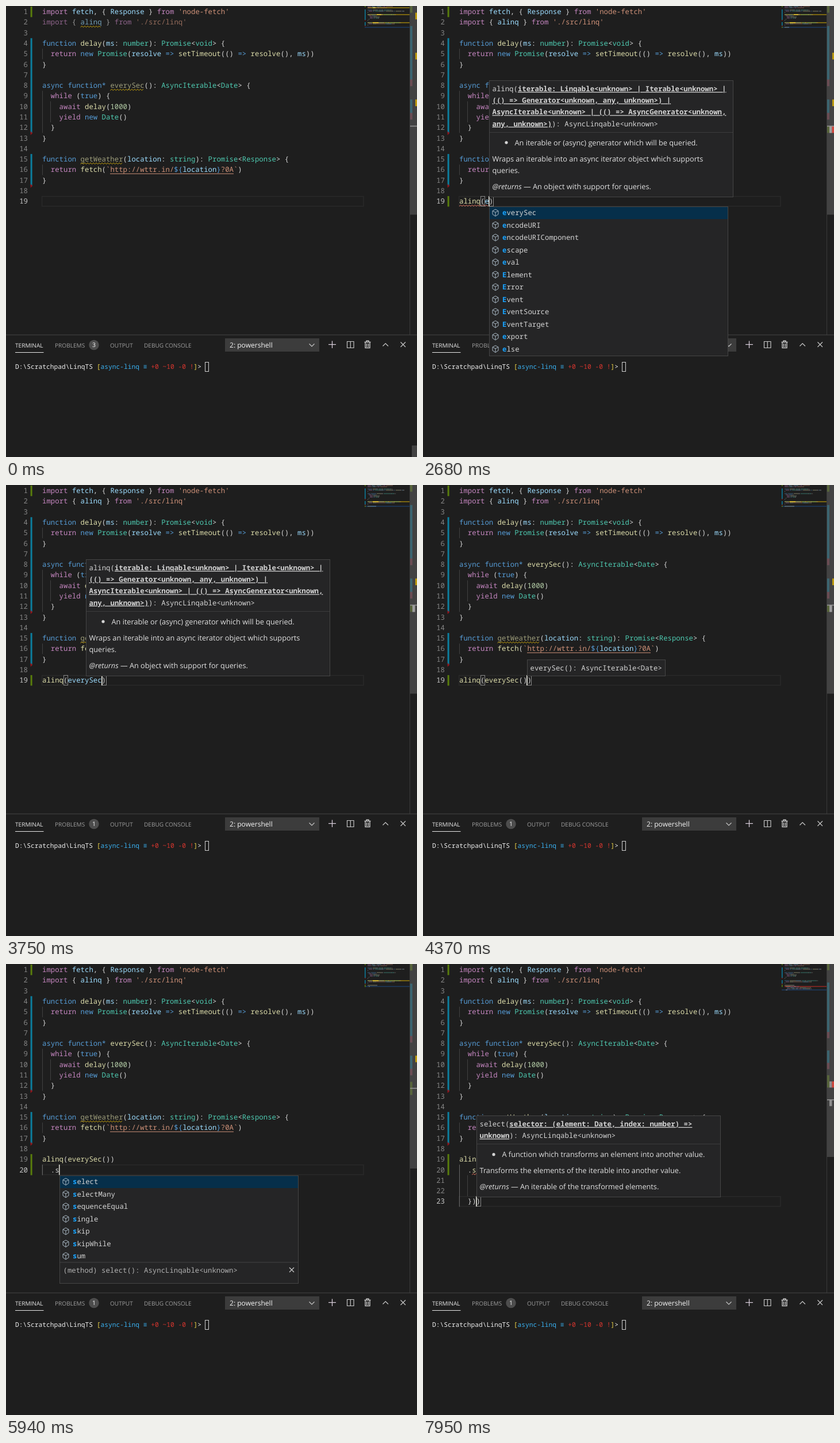
Animation, 715 px wide and 783 px high, one loop 8000 ms. Source, as an HTML page:

```html
<!DOCTYPE html>
<html lang="en">
<head>
<meta charset="utf-8">
<title>Editor typing</title>
<style>
html, body { margin: 0; width: 100%; height: 100%; overflow: hidden; background: #1e1e1e; }
svg { display: block; width: 715px; height: 783px; }
text { white-space: pre; text-rendering: geometricPrecision; fill: #d4d4d4; }
.m { font-family: "Noto Sans Mono", "DejaVu Sans Mono", monospace; font-size: 12.333px; font-weight: 500; }
.t { font-size: 11.26px; }
.u { font-family: "Open Sans", "Noto Sans", sans-serif; font-size: 12.73px; fill: #e0e0e0; }
.tab { font-size: 10.1px; fill: #9d9d9d; }
</style>
</head>
<body>
<svg id="stage" viewBox="0 0 715 783"></svg>
<script>
const LOOP = 8000, LH = 18.28, CW = 7.4, LEFT = 63, VIEW = 571;
const BLUE = '#569cd6', PURPLE = '#c586c0', TEAL = '#4ec9b0', YELLOW = '#dcdcaa',
  VAR = '#9cdcfe', STR = '#ce9178', NUM = '#b5cea8', PLAIN = '#d4d4d4';
const MOD = '#0c7d9d', ADD = '#587c0c', DEL = '#94151b', WARN = '#c9a40a', ERR = '#e8483c';

const code = [
  "import fetch, { Response } from 'node-fetch'",
  "import { alinq } from './src/linq'",
  "",
  "function delay(ms: number): Promise<void> {",
  "  return new Promise(resolve => setTimeout(() => resolve(), ms))",
  "}",
  "",
  "async function* everySec(): AsyncIterable<Date> {",
  "  while (true) {",
  "    await delay(1000)",
  "    yield new Date()",
  "  }",
  "}",
  "",
  "function getWeather(location: string): Promise<Response> {",
  "  return fetch(`http://wttr.in/${location}?0A`)",
  "}",
  ""
];
const CALL = 'alinq(everySec())';
const lambda = [
  CALL,
  "  .select(async date => {",
  "    const weather = await getWeather('London')",
  "    return { date, text: await weather.text() }",
  "  }))"
];

const tips = {
  alinq: {
    head: ['alinq(*iterable: Linqable<unknown> | Iterable<unknown> |',
      '*(() => Generator<unknown, any, unknown>) |',
      '*AsyncIterable<unknown> | (() => AsyncGenerator<unknown,',
      '*any, unknown>)*): AsyncLinqable<unknown>'],
    docs: ['An iterable or (async) generator which will be queried.',
      'Wraps an iterable into an async iterator object which supports',
      '+queries.', '@ — An object with support for queries.']
  },
  everySec: { head: ['everySec(): AsyncIterable<Date>'], docs: [] },
  select: {
    head: ['select(*selector: (element: Date, index: number) =>',
      '*unknown*): AsyncLinqable<unknown>'],
    docs: ['A function which transforms an element into another value.',
      'Transforms the elements of the iterable into another value.',
      '@ — An iterable of the transformed elements.']
  }
};

const menus = {
  a: ['alinq async await any as abstract Array ArrayBuffer AsyncIterable Atomics alert arguments', 'function alinq(iterable: Linqable<unknown>)'],
  al: ['alinq alert', 'function alinq(iterable: Linqable<unknown>)'],
  ali: ['alinq', 'function alinq(iterable: Linqable<unknown>)'],
  e: ['everySec encodeURI encodeURIComponent escape eval Element Error Event EventSource EventTarget export else', ''],
  eve: ['everySec Event EventSource EventTarget', 'function everySec(): AsyncIterable<Date>'],
  every: ['everySec', 'function everySec(): AsyncIterable<Date>'],
  '.': ['aggregate all any append average concat count distinct elementAt except first groupBy', '(method) aggregate(): Promise<Date>'],
  s: ['select selectMany sequenceEqual single skip skipWhile sum', '(method) select(): AsyncLinqable<unknown>'],
  se: ['select selectMany sequenceEqual', '(method) select(): AsyncLinqable<unknown>'],
  sele: ['select selectMany', '(method) select(): AsyncLinqable<unknown>']
};

// Each step overrides part of the state from its time on.
const line19 = (s, caret, more) => ({ lines: [s], caret: [19, caret], ...more });
const line20 = (s, more) => ({ lines: [CALL, '  ' + s], caret: [20, 2 + s.length], ...more });
const pair19 = n => [[19, 5], [19, n]];
const steps = [
  [0, { lines: [''], caret: [19, 0], blink: true, bar: true, warn: [2, 8, 15], dim: [2, 8, 15],
    added: 0, badge: 3, err: null, pair: [], tip: null, menu: null, method: false }],
  [400, line19('a', 1, { blink: false, bar: false })],
  [540, { menu: ['a', 1, 'a'] }],
  [710, line19('al', 2)],
  [780, { menu: ['al', 2, 'al'] }],
  [850, { added: 1, err: [19, 0, 1] }],
  [1080, line19('ali', 3, { menu: ['ali', 3, 'ali'] })],
  [1170, line19('alin', 4, { menu: ['ali', 4, 'alin'], badge: 4 })],
  [1420, line19('alinq', 5, { menu: null, warn: [8, 15], badge: 3 })],
  [1500, { err: null, badge: 2 }],
  [1810, { dim: [8, 15] }],
  [2300, line19('alinq()', 6, { pair: pair19(6) })],
  [2440, { tip: ['alinq', 6] }],
  [2600, line19('alinq(e)', 7, { pair: pair19(7), tip: ['alinq', 7] })],
  [2680, { menu: ['e', 7, 'e'], err: [19, 0, 7], badge: 3 }],
  [2770, line19('alinq(ev)', 8, { pair: pair19(8), tip: ['alinq', 8], menu: ['eve', 8, 'ev'] })],
  [2860, line19('alinq(eve)', 9, { pair: pair19(9), tip: ['alinq', 9], menu: ['eve', 9, 'eve'] })],
  [3030, line19('alinq(ever)', 10, { pair: pair19(10), tip: ['alinq', 10], menu: ['every', 10, 'ever'] })],
  [3120, line19('alinq(every)', 11, { pair: pair19(11), tip: ['alinq', 11], menu: ['every', 11, 'every'] })],
  [3520, line19('alinq(everySec)', 14, { pair: pair19(14), menu: null })],
  [3600, { err: null }],
  [3680, { warn: [15], dim: [15] }],
  [3750, { badge: 1 }],
  [3930, line19(CALL, 15, { pair: [[19, 14], [19, 15]] })],
  [4050, { tip: ['everySec', 15] }],
  [4290, line19(CALL, 16, { pair: pair19(16) })],
  [4370, { tip: ['everySec', 16] }],
  [4450, { tip: ['alinq', 16] }],
  [4610, line19(CALL, 17, { pair: pair19(16) })],
  [4690, { tip: null }],
  [5090, { lines: [CALL, ''], caret: [20, 0], pair: [] }],
  [5410, line20('')],
  [5630, line20('.')],
  [5710, { menu: ['.', 3, ''] }],
  [5790, line20('.s', { menu: ['s', 4, 's'] })],
  [5870, { added: 2 }],
  [5950, line20('.se', { menu: ['se', 5, 'se'] })],
  [6030, line20('.sel', { menu: ['sele', 6, 'sel'] })],
  [6100, line20('.sele', { menu: ['sele', 7, 'sele'] })],
  [6330, line20('.select', { menu: null })],
  [6490, { method: true }],
  [6740, { lines: [CALL, '  .select()'], caret: [20, 10], pair: [[20, 9], [20, 10]] }],
  [6820, { tip: ['select', 10] }],
  [6980, { err: [20, 3, 9] }],
  [7180, { badge: 2 }],
  [7950, { lines: lambda, caret: [23, 4], pair: [[20, 9], [23, 4]], tip: ['select', 4],
    warn: [], dim: [], badge: 1 }]
];

const esc = s => s.replace(/&/g, '&amp;').replace(/</g, '&lt;');
const x = col => LEFT + col * CW;
const top_ = n => (n - 1) * LH + 1;
const rect = (x, y, w, h, fill, extra = '') =>
  `<rect x="${x}" y="${y}" width="${w}" height="${h}" fill="${fill}" ${extra}/>`;
const frame = (x, y, w, h, stroke, fill = 'none') =>
  rect(x + .5, y + .5, w - 1, h - 1, fill, `stroke="${stroke}"`);
const path = (d, color, w = 1) =>
  `<path d="${d}" fill="none" stroke="${color}" stroke-width="${w}"/>`;
const span = (s, color, extra = '') => `<tspan style="fill:${color}" ${extra}>${esc(s)}</tspan>`;
const text = (x, y, body, cls = 'm', extra = '') =>
  `<text class="${cls}" x="${x}" y="${y}" ${extra}>${body}</text>`;

const TOKEN = /'[^']*'|`http[^$]*|\$\{|\}(?=\?)|\?0A`|=>|[A-Za-z]+|\d+|\s+|./g;
function tokens(line, method) {
  return [...line.matchAll(TOKEN)].map(({ 0: s, index: i }) => {
    const next = line[i + s.length], prev = line[i - 1];
    let c = PLAIN;
    if (/^['`?]/.test(s)) c = STR;
    else if (/^(\$\{|=>)$/.test(s) || s === '}' && next === '?') c = BLUE;
    else if (/^(import|from|return|while|await|yield)$/.test(s)) c = PURPLE;
    else if (/^(function|async|new|true|const)$/.test(s) || s === '*') c = BLUE;
    else if (/^(Promise|void|number|string|Date|AsyncIterable)$/.test(s) || s === 'Response' && next === '>') c = TEAL;
    else if (/^\d/.test(s)) c = NUM;
    else if (/^[A-Za-z]/.test(s)) c = next === '(' ? YELLOW : prev === '.' ? (method ? YELLOW : PLAIN) : VAR;
    return { s, c, i };
  });
}

function squiggle(n, from, to, color) {
  let d = '', y = top_(n) + 16.5, end = x(to);
  for (let px = x(from), up = 0; px <= end; px += 2.5, up ^= 1)
    d += `${d ? 'L' : 'M'}${px.toFixed(1)} ${y + (up ? -1.1 : 1.1)}`;
  return path(d, color);
}

const unusedName = { 2: [9, 14], 8: [16, 24], 15: [9, 19] };

function editor(s, lines) {
  let out = '';
  const [row] = s.caret;
  out += rect(62.5, top_(row) + .5, 559.5, 17, 'none', 'stroke="#2a2a2a" stroke-width="1.4"');
  const guide = (n, count, col, c = '#404040') =>
    rect(Math.floor(x(col)), top_(n), 1, LH * count, c);
  out += guide(5, 1, 0) + guide(9, 4, 0) + guide(10, 2, 2) + guide(16, 1, 0);
  if (lines.length > 19) out += guide(20, lines.length - 19, 0, '#666');
  if (lines.length > 22) out += guide(21, 2, 2);
  lines.forEach((line, k) => {
    const n = k + 1, base = top_(n) + 13.2;
    out += text(38, base, n, 'm', `text-anchor="end" style="fill:${n === row ? '#c6c6c6' : '#858585'}"`);
    const faded = s.dim.includes(n);
    const body = tokens(line, s.method).map(t => span(t.s, t.c,
      faded && n > 2 && t.i === unusedName[n][0] ? 'fill-opacity=".667"' : '')).join('');
    out += text(LEFT, base, body, 'm', faded && n === 2 ? 'opacity=".667"' : '');
  });
  out += rect(181, top_(16) + 15.5, x(45) - 181, 1, STR);
  s.warn.forEach(n => out += squiggle(n, ...unusedName[n], WARN));
  if (s.err) out += squiggle(...s.err, '#f07a66');
  const mark = (n, count, c) => rect(42.6, top_(n), 3, LH * count, c);
  out += mark(1, 1, ADD) + mark(4, 9, MOD) + mark(15, 3, MOD);
  if (s.added) out += mark(19, s.added, ADD);
  [13, 18].forEach(n => out += `<path d="M42.6 ${top_(n) - 3}v7l3.6-3.5z" fill="${DEL}"/>`);
  s.pair.forEach(([n, c]) => out += frame(Math.round(x(c)), Math.round(top_(n)), 8, 18, '#888'));
  if (!s.blink) out += rect(Math.round(x(s.caret[1])) - 1, top_(row), 1.6, 18, '#d8d8d0');
  return out;
}

function minimap(s, lines) {
  let out = '';
  const band = (n, from, w, c, o = 1) => rect(629 + from, (n - 1) * 2, w, 2, c, `opacity="${o}"`);
  s.warn.forEach(n => {
    const [a, b] = unusedName[n];
    out += band(n, 0, 73, WARN, .55) + band(n, a, b - a, WARN);
  });
  if (s.err) out += band(s.err[0], 0, 73, '#b02a25', .6);
  out += band(s.caret[0], -5, 78, '#1d3350');
  lines.forEach((line, k) => tokens(line, s.method).forEach(t => {
    if (t.s.trim()) out += rect(629 + t.i, k * 2 + .4, t.s.length, 1.2, t.c, 'opacity=".42"');
  }));
  const mark = (n, count, c) => rect(624, (n - 1) * 2, 1.5, count * 2, c);
  out += mark(1, 1, ADD) + mark(4, 9, MOD) + mark(15, 3, MOD) + mark(13, .6, DEL) + mark(18, .6, DEL);
  return out + (s.added ? mark(19, s.added, ADD) : '');
}

function ruler(s, count) {
  const total = (count - 1) * LH + VIEW, h = LH * VIEW / total;
  const mark = (n, k, lane, w, c, o = .6) => rect(703 + lane, (n - 1) * h, w, h * k, c, `opacity="${o}"`);
  let out = rect(702, 0, 1, VIEW, '#3a3a3a');
  out += mark(1, 1, 0, 4, ADD) + mark(4, 9, 0, 4, MOD) + mark(12, 1, 0, 4, DEL)
    + mark(15, 3, 0, 4, MOD) + mark(17, 1, 0, 4, DEL);
  if (s.added) out += mark(19, s.added, 0, 4, ADD);
  out += rect(703, 0, 12, VIEW * VIEW / total, '#797979', 'opacity=".4"');
  s.warn.forEach(n => out += mark(n, 1, 9, 3, WARN, .9));
  s.pair.forEach(([n]) => out += mark(n, 1, 4, 4.5, '#a0a0a0', .8));
  if (s.err) out += mark(s.err[0], 1, 8.5, 3.5, ERR, .85);
  return out + rect(703, (s.caret[0] - 1) * h - 1, 12, 1.6, '#929292');
}

function signature([name, col], n) {
  const { head, docs } = tips[name], ROW = 20.2;
  const gap = d => d[0] === '+' ? ROW : 28;
  let h = 29 + ROW * (head.length - 1);
  if (docs.length) h += 23 + docs.slice(1).reduce((a, d) => a + gap(d), 0) + 14;
  h = Math.round(h);
  const left = name === 'alinq' ? Math.min(Math.round(x(col)), 139) : Math.round(x(col));
  const w = docs.length ? 425 : 241, top = Math.round(top_(n)) + 2 - h;
  let y = top + 19, out = frame(left, top, w, h, '#454545', '#252526');
  head.forEach((line, k) => {
    const body = line.split('*').map((part, i) =>
      span(part, PLAIN, i % 2 ? 'font-weight="700" text-decoration="underline"' : '')).join('');
    out += text(left + 5.5, y + k * ROW, body);
  });
  y += ROW * (head.length - 1);
  if (docs.length) out += rect(left + 1, Math.round(y + 10), w - 2, 1, '#3c3c3c');
  y += 33;
  docs.forEach((d, k) => {
    if (k) y += gap(d);
    else out += `<circle cx="${left + 30}" cy="${y - 4.5}" r="2.6" fill="#d4d4d4"/>`;
    const body = d[0] === '@' ? '<tspan font-style="italic">@returns</tspan>' + d.slice(1) : d.replace('+', '');
    out += text(left + (k ? 5.5 : 44.5), y, body, 'u');
  });
  return out;
}

function suggest([key, col, typed], n) {
  const [names, detail] = menus[key], rows = names.split(' ');
  const left = Math.round(x(col)), top = Math.round(top_(n) + LH), rh = 21.5;
  const listH = rows.length * rh, h = listH + (detail ? 37.5 : 2);
  let out = frame(left, top, 416, h, '#454545', '#252526') + rect(left + 1, top + 1, 414, rh - .5, '#062f4a');
  rows.forEach((name, k) => {
    const y = top + k * rh, cx = left + 11, cy = y + 11;
    out += path(`M${cx} ${cy - 6}l5 2.7v6l-5 3.3l-5-3.3v-6zM${cx - 5} ${cy - 3.3}l5 2.6l5-2.6M${cx} ${cy - .7}v6.5`, '#a9b8c4');
    out += text(left + 23, y + 15, span(name.slice(0, typed.length), '#18a3ff', 'font-weight="700"')
      + span(name.slice(typed.length), PLAIN));
  });
  if (detail) {
    const y = top + listH, cx = left + 404, cy = y + 13.5;
    out += rect(left + 1, y, 414, 1, '#454545')
      + text(left + 6.5, y + 18, span(detail, '#b0b0b0'))
      + path(`M${cx - 4} ${cy - 4}l8 8m0-8l-8 8`, '#c5c5c5', 1.3);
  }
  return out;
}

function panel(s) {
  const tab = (x, label, extra = '') => text(x, 592.5, label, 'u tab', extra);
  const I = '#c5c5c5';
  let out = rect(0, 570.5, 715, 1, '#454545')
    + tab(16, 'TERMINAL', 'style="fill:#e7e7e7"') + rect(16, 601, 49.5, 1, '#e7e7e7')
    + tab(85, 'PROBLEMS') + tab(181, 'OUTPUT') + tab(240, 'DEBUG CONSOLE')
    + '<circle cx="153" cy="588.5" r="8.7" fill="#4d4d4d"/>'
    + text(153, 592.3, s.badge, 'u', 'text-anchor="middle" style="font-size:10.5px;fill:#fff"')
    + rect(381, 577, 164, 23, '#3c3c3c')
    + text(389, 593, '2: powershell', 'u', 'style="font-size:12.06px;fill:#f5f5f5"')
    + path('M527.5 586.5l4.5 4.5l4.5-4.5', I, 1.2)
    + path('M567.5 581.5v12.5M561 587.7h13', '#d5cbd8', 1.3)
    + path('M593.5 582.5h11.5v11h-11.5zM599.3 582.5v11', I, 1.2)
    + path('M623.5 583.5h11M627 583v-1.7h4v1.7M625 584v9.5h8v-9.5M627.5 586v6M630.5 586v6', I, 1.4)
    + path('M655.5 590.5l4.7-4.7l4.7 4.7', I, 1.3)
    + path('M686.5 583.5l8.5 8.5m0-8.5l-8.5 8.5', I, 1.2);
  const cyan = '#3ab0f0', red = '#d8362f', gold = '#f0d84a', white = '#ededed';
  out += text(16, 630, span('D:\\Scratchpad\\LinqTS ', white) + span('[', gold)
    + span('async-linq ≡ ', cyan) + span('+0 ~10 -0 !', red) + span(']', gold) + span('>', white), 'm t');
  out += frame(346, 618, 7, 17, '#cfcfcf');
  return out + (s.bar ? rect(706, 763, 9, 20, '#424242') : '');
}

const stage = document.getElementById('stage');
let shown = -1;

function render(t) {
  const active = steps.filter(([at]) => at <= t);
  if (active.length === shown) return;
  shown = active.length;
  const s = Object.assign({}, ...active.map(a => a[1]));
  const lines = code.concat(s.lines);
  stage.innerHTML = rect(0, 0, 715, 783, '#1e1e1e') + editor(s, lines) + minimap(s, lines)
    + ruler(s, lines.length) + panel(s)
    + (s.tip ? signature(s.tip, s.caret[0]) : '') + (s.menu ? suggest(s.menu, s.caret[0]) : '');
}

const start = performance.now();
function tick() {
  render((performance.now() - start) % LOOP);
  requestAnimationFrame(tick);
}
tick();
</script>
</body>
</html>
```
